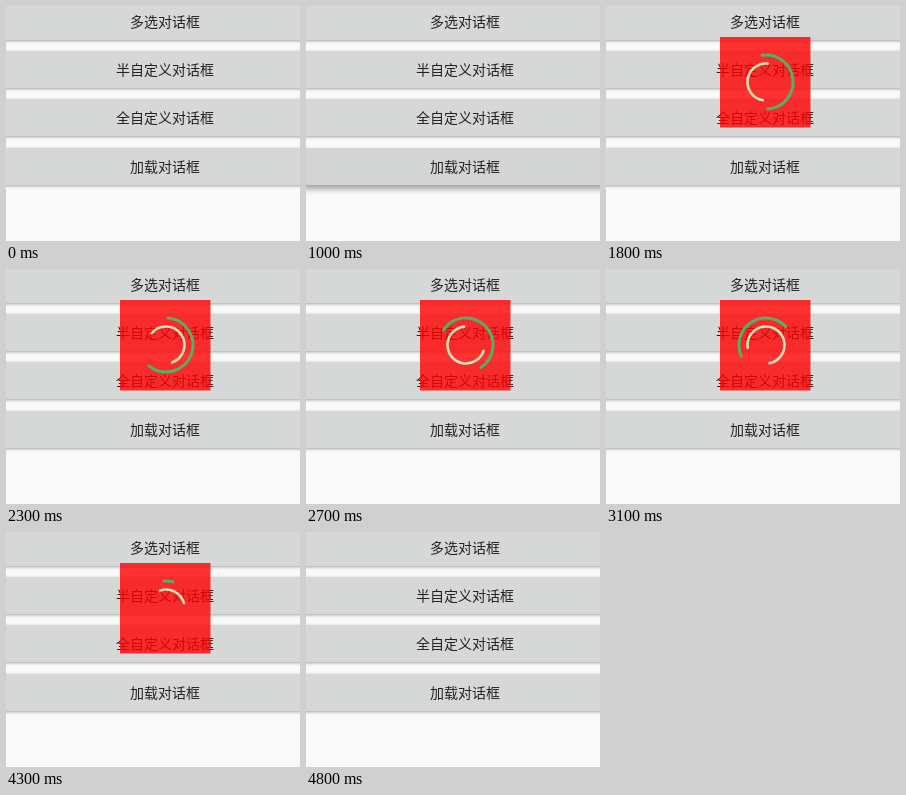
An HTML page for the animation above (5700 ms loop, 294 by 235 pixels).

```html
<!DOCTYPE html>
<html lang="zh-CN">
<head>
<meta charset="utf-8">
<style>
html, body { margin: 0; width: 100%; height: 100%; overflow: hidden; background: #fafafa; }
#stage { position: relative; width: 294px; height: 235px; overflow: hidden; }
.btn {
  position: absolute; left: -6px; width: 330px; height: 37px;
  background: #d6d8d7; box-shadow: 0 1px 3px rgba(0, 0, 0, .36);
  font: 14px/37px "Noto Sans CJK SC", "Noto Sans CJK", sans-serif;
  color: #222; text-align: center; white-space: nowrap;
}
#dialog { position: absolute; left: 0; top: 0; }
#dialog path { fill: none; stroke-linecap: round; }
</style>
</head>
<body>
<div id="stage">
  <svg id="dialog" width="294" height="235">
    <rect x="114" y="31" width="90.5" height="90.5" fill="#f00" fill-opacity=".8"/>
    <path id="outer" stroke="#50b264" stroke-width="3"/>
    <path id="inner" stroke="#cfdfb6" stroke-width="2.6"/>
  </svg>
</div>
<script>
const LOOP = 5700, STEP = 100;
const [dialog, outer, inner] = ['dialog', 'outer', 'inner'].map(id => document.getElementById(id));

const buttons = ['多选', '半自定义', '全自定义', '加载'].map((label, i) => {
  const el = document.createElement('div');
  el.className = 'btn';
  el.textContent = label + '对话框';
  el.style.top = Math.floor(48.4 * i) - 3 + 'px';
  dialog.before(el);
  return el;
});
const loadBtn = buttons[3].style;

const ramp = (t, from, to) => Math.min(1, Math.max(0, (t - from) / (to - from)));

// Angles in degrees from twelve o'clock; dir 1 is clockwise, -1 counterclockwise
function arc(path, r, dir, mid, sweep) {
  const point = deg => {
    const a = deg * Math.PI / 180;
    return `${(160 + dir * r * Math.sin(a)).toFixed(2)} ${(76 - r * Math.cos(a)).toFixed(2)}`;
  };
  const large = sweep > 180 ? 1 : 0, side = dir > 0 ? 1 : 0;
  path.setAttribute('d',
    `M${point(mid - sweep / 2)}A${r} ${r} 0 ${large} ${side} ${point(mid + sweep / 2)}`);
}

function draw(time) {
  const t = Math.floor(time % LOOP / STEP) * STEP;

  const press = t < 1000 ? 0 : 1 - ramp(t, 1200, 1500);
  loadBtn.boxShadow = `0 ${1 + 3 * press}px ${3 + 3 * press}px rgba(0,0,0,.36)`;
  loadBtn.backgroundColor = press > .5 ? '#d3d5d4' : '#d6d8d7';

  dialog.style.opacity = ramp(t, 1100, 1300) * (1 - ramp(t, 4600, 4800));

  // Both arcs spin against each other while their lengths swell and shrink
  const s = (t - 1800) / 1000;
  arc(outer, 27, 1, 84 + s * (796 - 43 * s), 115 + 100 * Math.cos(1.46 * s - .8));
  arc(inner, 18.5, -1,
    82.5 + s * (445 + s * (17.3 * s - 8.5)),
    Math.max(15, 175 + s * (47 + s * (72.6 - 41.8 * s))));
}

const start = performance.now();
function tick() {
  draw(performance.now() - start);
  requestAnimationFrame(tick);
}
tick();
</script>
</body>
</html>
```
